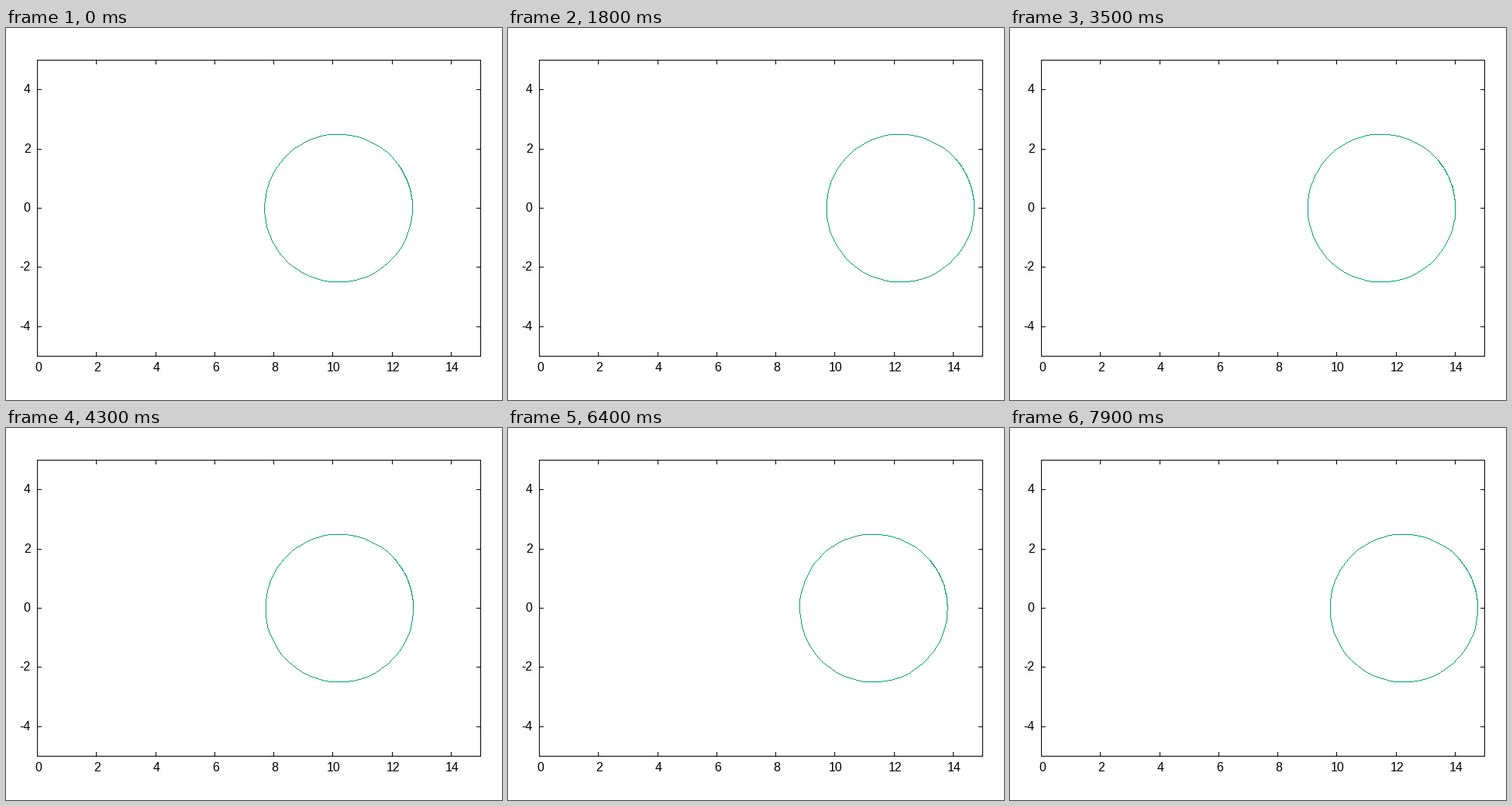
Write a matplotlib script that moves like this. It is 640x480 px and loops after 8 s.

```python
import numpy as np
import matplotlib.pyplot as plt
from matplotlib.animation import FuncAnimation

W, H, DPI = 640, 480, 80
FRAMES, STEP = 80, 100
LEFT, RIGHT, TOP, BOTTOM = 40, 612, 41, 423
SX, SY = (RIGHT - LEFT) / 15, (BOTTOM - TOP) / 10
TIC = 5
BLACK, GREEN = (0, 0, 0), (0, 158, 115)

# Morse-type oscillation of the centre, in pixels and frames
PERIOD, TURN = 57.44, 50.3
NEAR, SCALE, ECC = 389.15, 58.15, 0.77

ANGLES = np.linspace(0, 7, 100)


def to_px(v):
    return np.floor(np.asarray(v) + 0.5).astype(int)


def row(y):
    return H - 1 - to_px(H - 1 - BOTTOM + (y + 5) * SY)


def segment(img, x0, y0, x1, y1, color):
    n = max(abs(x1 - x0), abs(y1 - y0)) + 1
    img[to_px(np.linspace(y0, y1, n)), to_px(np.linspace(x0, x1, n))] = color


def polyline(img, xs, ys, color):
    for x0, y0, x1, y1 in zip(xs, ys, xs[1:], ys[1:]):
        segment(img, x0, y0, x1, y1, color)


def centre(i):
    phase = 2 * np.pi * (i - TURN) / PERIOD
    return NEAR + SCALE * np.log((1 - ECC * np.cos(phase)) / (1 - ECC))


fig = plt.figure(figsize=(W / DPI, H / DPI), dpi=DPI, facecolor="white")
ax = fig.add_axes([0, 0, 1, 1])
ax.axis("off")

base = np.full((H, W, 3), 255, np.uint8)
polyline(base, [LEFT, RIGHT, RIGHT, LEFT, LEFT],
         [TOP, TOP, BOTTOM, BOTTOM, TOP], BLACK)

font = dict(family="Liberation Sans", size=16 * 72 / DPI, color="black",
            va="baseline")
for v in range(0, 15, 2):
    x = int(to_px(LEFT + v * SX))
    segment(base, x, TOP, x, TOP + TIC, BLACK)
    segment(base, x, BOTTOM, x, BOTTOM - TIC, BLACK)
    ax.text(x + 1, 442.5, str(v), ha="center", **font)
for v in range(-4, 5, 2):
    y = int(row(v))
    segment(base, LEFT, y, LEFT + TIC, y, BLACK)
    segment(base, RIGHT, y, RIGHT - TIC, y, BLACK)
    ax.text(31, y + 4.5, str(v), ha="right", **font)

view = ax.imshow(base, interpolation="nearest", aspect="auto",
                 extent=(-0.5, W - 0.5, H - 0.5, -0.5))
ax.set_xlim(-0.5, W - 0.5)
ax.set_ylim(H - 0.5, -0.5)

CIRCLE_Y = row(2.5 * np.sin(ANGLES))


def draw(i):
    img = base.copy()
    xs = to_px(centre(i) + 2.5 * SX * np.cos(ANGLES))
    polyline(img, xs, CIRCLE_Y, GREEN)
    view.set_data(img)
    return [view]


anim = FuncAnimation(fig, draw, frames=FRAMES, interval=STEP, repeat=True,
                     repeat_delay=0, blit=False)
plt.show()
```
